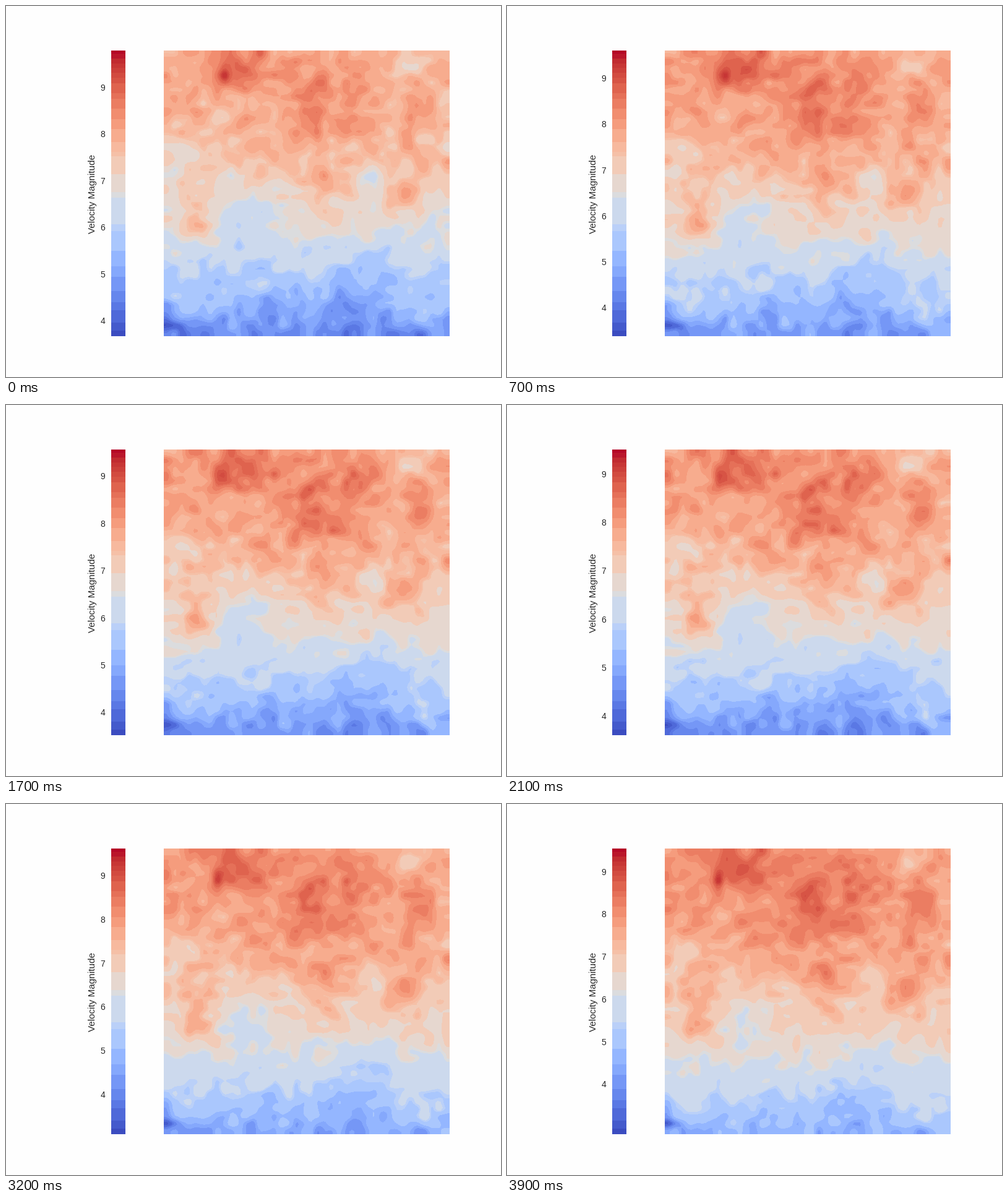
A matplotlib script for the animation above (4000 ms loop, 800 by 600 pixels).

```python
import numpy as np
import matplotlib
import matplotlib.pyplot as plt
from matplotlib.animation import FuncAnimation
from matplotlib.patches import Rectangle

W, H, DPI = 800, 600, 100
LEFT, TOP, SIDE = 255, 72, 462
BOTTOM = TOP + SIDE
CELLS, FRAMES = 40, 40
INK = "#262626"

matplotlib.rcParams["font.family"] = "Liberation Sans"

# Heights of the colour bands in pixels, from the bottom of the bar up.
BANDS = [9, 13, 21, 13, 18, 24, 17, 25, 33, 11, 44, 9, 30, 29, 7, 16, 22, 16,
         17, 17, 9, 16, 9, 8, 9, 7, 8, 8, 5]
LEVELS = np.cumsum([0] + BANDS) / sum(BANDS)
coolwarm = plt.get_cmap("coolwarm")
COLORS = coolwarm((LEVELS[:-1] + LEVELS[1:]) / 2)
COLORS[0], COLORS[-1] = coolwarm([0.0, 1.0])

# Speed range of the scale at key frames.
KEYS = [0, 7, 12, 21, 28, 35, 39]
LOW = [3.66, 3.38, 3.41, 3.60, 3.24, 2.98, 2.82]
HIGH = [9.79, 9.60, 9.63, 9.50, 9.59, 9.63, 9.54]

# Lasting fast and slow regions: x, y, radius, strength.
REGIONS = [
    (350, 100, 18, 0.8), (405, 95, 24, 0.6), (487, 150, 20, 0.5),
    (488, 212, 22, 0.6), (540, 190, 20, 0.7), (570, 135, 17, 0.6),
    (672, 165, 17, 0.8), (515, 285, 22, 0.6), (647, 308, 20, 0.7),
    (312, 357, 22, 0.9), (675, 490, 32, 0.5), (648, 97, 14, -0.9),
    (265, 225, 40, -0.45), (690, 110, 50, -0.25), (387, 335, 32, -0.8),
    (590, 280, 16, -0.5), (600, 440, 38, -0.5), (520, 492, 24, -0.5),
]

centres = np.arange(CELLS) + 0.5
gx, gy = np.meshgrid(LEFT + centres * SIDE / CELLS, TOP + centres * SIDE / CELLS)


def bump(x, y, rx, ry):
    return np.exp(-((gx - x) / rx) ** 2 / 2 - ((gy - y) / ry) ** 2 / 2)


def soften(a):
    p = np.pad(a, 1, mode="edge")
    p = 0.12 * p[:-2] + 0.76 * p[1:-1] + 0.12 * p[2:]
    return 0.12 * p[:, :-2] + 0.76 * p[:, 1:-1] + 0.12 * p[:, 2:]


rng = np.random.default_rng(5)
grain = rng.normal(0, 0.38, gx.shape)
phase = rng.uniform(0, 2 * np.pi, gx.shape)
rate = rng.uniform(-0.2, 0.2, gx.shape)

mean = 8.05 - 3.5 * ((gy - TOP) / SIDE) ** 2
mean += sum(k * bump(x, y, r, r) for x, y, r, k in REGIONS)

# Bilinear resampling, constant beyond the outer cell centres.
fine = np.linspace(0, CELLS, 121)
resample = np.array([np.interp(fine, centres, row) for row in np.eye(CELLS)]).T
fine_x, fine_y = LEFT + fine * SIDE / CELLS, TOP + fine * SIDE / CELLS


def field(i, low, high):
    t = i / (FRAMES - 1)
    v = mean + soften(grain + 0.33 * np.sin(phase + rate * i))
    v = np.clip(v, low + 0.35, high - 0.5)
    v += (high - v) * bump(352 - 9 * t, 114 + 8 * t, 6, 9)
    v += (low - v) * bump(260, 517, 22 - 10 * t, 6)
    return resample @ v @ resample.T


fig = plt.figure(figsize=(W / DPI, H / DPI), dpi=DPI, facecolor="#fefefe")
ax = fig.add_axes([0, 0, 1, 1])
ax.axis("off")

for level, band, color in zip(LEVELS, BANDS, COLORS):
    ax.add_patch(Rectangle((170, BOTTOM - level * SIDE - band), 23, band,
                           color=color, lw=0, antialiased=False))
ax.text(147, 304, "Velocity Magnitude", rotation=90, size=11, color=INK,
        ha="right", va="center")
ticks = {n: ax.text(160.3, 0, str(n), size=10, color=INK, ha="right",
                    va="center_baseline") for n in range(4, 10)}
filled = []


def draw(i):
    low, high = np.interp(i, KEYS, LOW), np.interp(i, KEYS, HIGH)
    while filled:
        filled.pop().remove()
    u = np.clip((field(i, low, high) - low) / (high - low), 0, 1)
    filled.append(ax.contourf(fine_x, fine_y, u, levels=LEVELS, colors=COLORS))
    ax.set(xlim=(0, W), ylim=(H, 0))
    for n, label in ticks.items():
        label.set_y(BOTTOM - (n - low) / (high - low) * SIDE)
    return filled + list(ticks.values())


anim = FuncAnimation(fig, draw, frames=FRAMES, interval=100,
                     init_func=lambda: [], blit=False, repeat=True)
plt.show()
```
